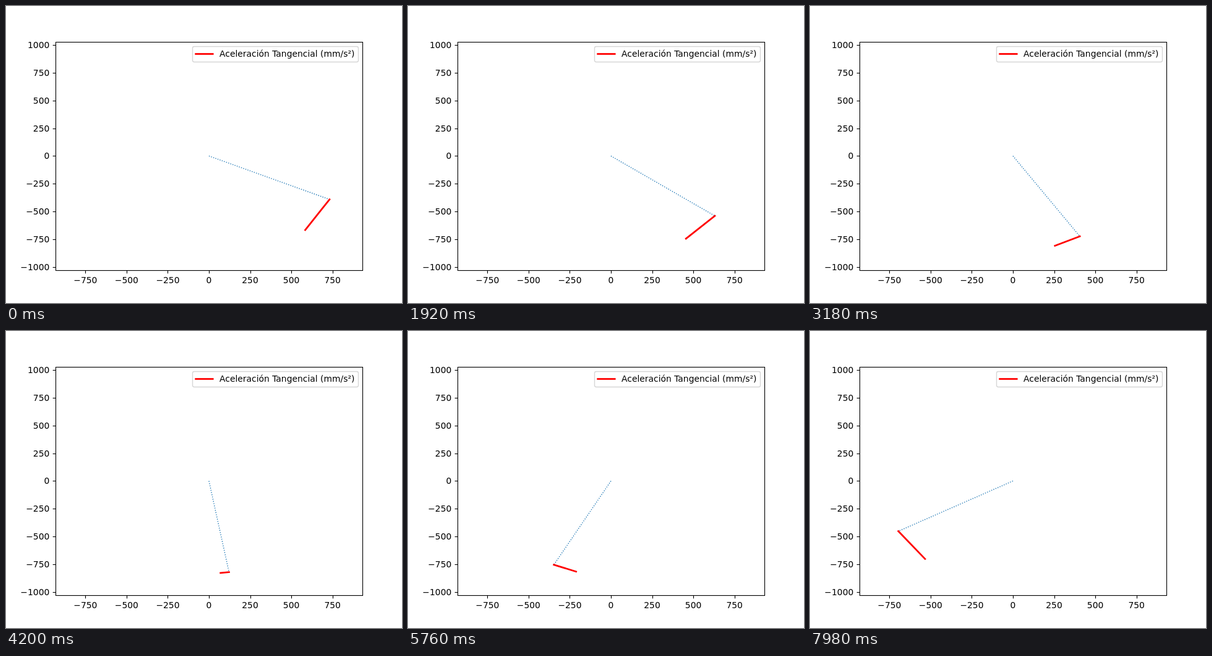
Write an HTML page that moves like this. It is 640 px wide and 480 px high and loops after 8 s.

```html
<!DOCTYPE html>
<html lang="es">
<head>
<meta charset="utf-8">
<title>Aceleración tangencial</title>
<style>
  html, body { margin: 0; width: 100%; height: 100%; overflow: hidden; background: #fff; }
  svg { display: block; width: 640px; height: 480px; }
  text { font: 13.889px "DejaVu Sans", sans-serif; fill: #000; }
  .axis { fill: none; stroke: #000; stroke-width: 1.11; }
  .accel { stroke: #f00; stroke-width: 2.78; stroke-linecap: square; }
  .rod { stroke: #1f77b4; stroke-width: 1.39; stroke-dasharray: 1.39 2.29; }
</style>
</head>
<body>
<svg viewBox="0 0 640 480">
  <rect width="640" height="480" fill="#fff"/>
  <g id="ticks"></g>
  <line id="rod" class="rod"/>
  <line id="accel" class="accel"/>
  <rect class="axis" x="80.5" y="58.5" width="496" height="369"/>
  <rect x="301.5" y="65.5" width="268" height="25" rx="2.8" fill="#fff" fill-opacity=".8"
        stroke="#ccc" stroke-opacity=".8" stroke-width="1.39"/>
  <line class="accel" x1="306.7" y1="77.5" x2="334.2" y2="77.5"/>
  <text x="345" y="82">Aceleración Tangencial (mm/s²)</text>
</svg>
<script>
const LOOP = 8000, STEP = 60;
const LENGTH = 830, START = 1.08, OMEGA = 0.02214, ACCEL = 355;

const px = x => 328 + x * 0.2662;
const py = y => 242.4 - y * 0.17944;
const snap = v => Math.floor(v + 0.5) + 0.5;
const byId = id => document.getElementById(id);

function add(parent, tag, attrs, text = "") {
  const el = document.createElementNS("http://www.w3.org/2000/svg", tag);
  for (const key in attrs) el.setAttribute(key, attrs[key]);
  el.textContent = text;
  parent.appendChild(el);
}

function drawTicks() {
  const g = byId("ticks");
  const label = v => String(v).replace("-", "\u2212");
  for (let v = -1000; v <= 1000; v += 250) {
    const y = snap(py(v));
    add(g, "path", { class: "axis", d: `M80.5 ${y}h-4.86` });
    add(g, "text", { x: 70.3, y: Math.round(py(v)) + 5, "text-anchor": "end" }, label(v));
    if (Math.abs(v) > 750) continue;
    add(g, "path", { class: "axis", d: `M${snap(px(v))} 427.5v4.86` });
    add(g, "text", { x: px(v), y: 448, "text-anchor": "middle" }, label(v));
  }
}

// Pendulum released from rest, integrated with small symplectic steps.
function swing(count) {
  const sub = 50, h = 1 / sub, angles = [];
  const pull = a => -OMEGA * OMEGA * Math.sin(a);
  let a = START, v = 0;
  for (let i = 0; i < count; i++) {
    angles.push(a);
    for (let j = 0; j < sub; j++) {
      v += pull(a) * h / 2;
      a += v * h;
      v += pull(a) * h / 2;
    }
  }
  return angles;
}

function setLine(el, x1, y1, x2, y2) {
  el.setAttribute("x1", px(x1));
  el.setAttribute("y1", py(y1));
  el.setAttribute("x2", px(x2));
  el.setAttribute("y2", py(y2));
}

const angles = swing(Math.ceil(LOOP / STEP));
const rod = byId("rod"), accel = byId("accel");

function render(time) {
  const a = angles[Math.floor(time / STEP)];
  const sin = Math.sin(a), cos = Math.cos(a);
  const x = LENGTH * sin, y = -LENGTH * cos, size = ACCEL * sin;
  setLine(rod, 0, 0, x, y);
  setLine(accel, x, y, x - size * cos, y - size * sin);
}

drawTicks();
render(0);
const begin = performance.now();
function tick() {
  render((performance.now() - begin) % LOOP);
  requestAnimationFrame(tick);
}
requestAnimationFrame(tick);
</script>
</body>
</html>
```
